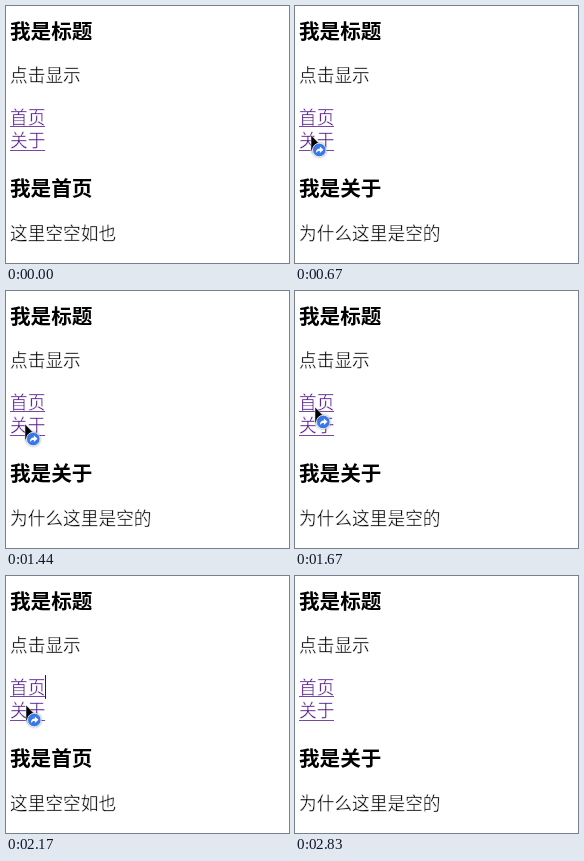
Recreate the animation shown at these times as an HTML page. Size 283 by 257 pixels, loop 3140 ms.

```html
<!DOCTYPE html>
<html lang="zh-CN">
<head>
<meta charset="utf-8">
<style>
html, body { margin: 0; width: 100%; height: 100%; overflow: hidden; background: #fff; }
svg { display: block; width: 283px; height: 257px; }
/* A white stroke over the fill thins the regular weight. */
text { font: 300 17.7px "Noto Sans CJK SC", "Noto Sans CJK", sans-serif; stroke: #fff; stroke-width: .4px; }
.h { font-size: 20.6px; font-weight: 700; stroke: none; }
.link { fill: #551a8b; }
</style>
</head>
<body>
<svg viewBox="0 0 283 257">
  <defs>
    <filter id="soft" x="-50%" y="-50%" width="200%" height="200%">
      <feGaussianBlur stdDeviation="1"/>
    </filter>
    <path id="arrow" d="M0 0V16L3.7 12.8L5.5 17H8.5L7.2 12H11.3Z"/>
  </defs>
  <text class="h" x="4" y="32.7">我是标题</text>
  <text x="4" y="75.6">点击显示</text>
  <g class="link">
    <text x="4" y="117.6">首页</text>
    <text x="4" y="141.4">关于</text>
    <path d="M4 120h35v1h-35zM4 144h35v1h-35z" opacity=".8"/>
  </g>
  <path id="caret" d="M39 99h1v24h-1z" fill="#222"/>
  <text class="h" id="title" x="4" y="189.7"></text>
  <text id="body" x="4" y="233.6"></text>
  <g id="cursor">
    <use href="#arrow" x="1" y="2" opacity=".45" filter="url(#soft)"/>
    <use href="#arrow" stroke="#fff" stroke-width=".5"/>
    <g id="badge" transform="translate(8.3 15)">
      <circle r="7.4" opacity=".3" filter="url(#soft)"/>
      <circle r="6.8" fill="#3b78e7" stroke="#fff" stroke-width=".8"/>
      <path d="M-3.5 3.2C-3.3 0-1.8-1.4 .6-1.4V-3.6L4.2-.2L.6 3V1C-1.2 1-2.5 1.6-3.5 3.2Z" fill="#fff"/>
    </g>
  </g>
</svg>
<script>
const LOOP = 3140, ENTER = 30, EXIT = 2830;
const $ = id => document.getElementById(id);
const show = (el, on) => el.setAttribute('visibility', on ? 'visible' : 'hidden');

const pages = [['我是首页', '这里空空如也'], ['我是关于', '为什么这里是空的']];
const clicks = [580, 1060, 1440, 1900, 2230];

const easeIn = k => k * k;
const easeOut = k => k * (2 - k);
const smooth = k => k * k * (3 - 2 * k);

// The pointer comes in, hops between the two links, and leaves.
const entry = { x: 212, y: 240 };
const moves = [
  { from: ENTER, to: 380, x: 16, y: 129, ease: easeOut },
  { from: 740, to: 920, x: 15, y: 112, ease: smooth },
  { from: 1160, to: 1290, x: 19, y: 133, ease: smooth },
  { from: 1480, to: 1670, x: 20, y: 116, ease: smooth },
  { from: 1990, to: 2120, x: 20, y: 129, ease: smooth },
  { from: 2260, to: 2500, x: 99, y: 175, ease: smooth },
  { from: 2550, to: EXIT, x: 228, y: 252, ease: easeIn }
];

function pointerAt(t) {
  let { x, y } = entry;
  for (const m of moves) {
    const k = m.ease(Math.min(1, Math.max(0, (t - m.from) / (m.to - m.from))));
    x += (m.x - x) * k;
    y += (m.y - y) * k;
  }
  return [Math.round(x), Math.round(y)];
}

function draw(t) {
  const count = clicks.filter(c => c <= t).length;
  const page = count % 2;
  [$('title').textContent, $('body').textContent] = pages[page];
  show($('caret'), count && !page);

  const [x, y] = pointerAt(t);
  const inside = t >= ENTER && t < EXIT;
  show($('cursor'), inside);
  show($('badge'), inside && x < 39 && y > 101 && y < 147);
  $('cursor').setAttribute('transform', `translate(${x} ${y})`);
}

const start = performance.now();
function tick() {
  draw((performance.now() - start) % LOOP);
  requestAnimationFrame(tick);
}
tick();
</script>
</body>
</html>
```
